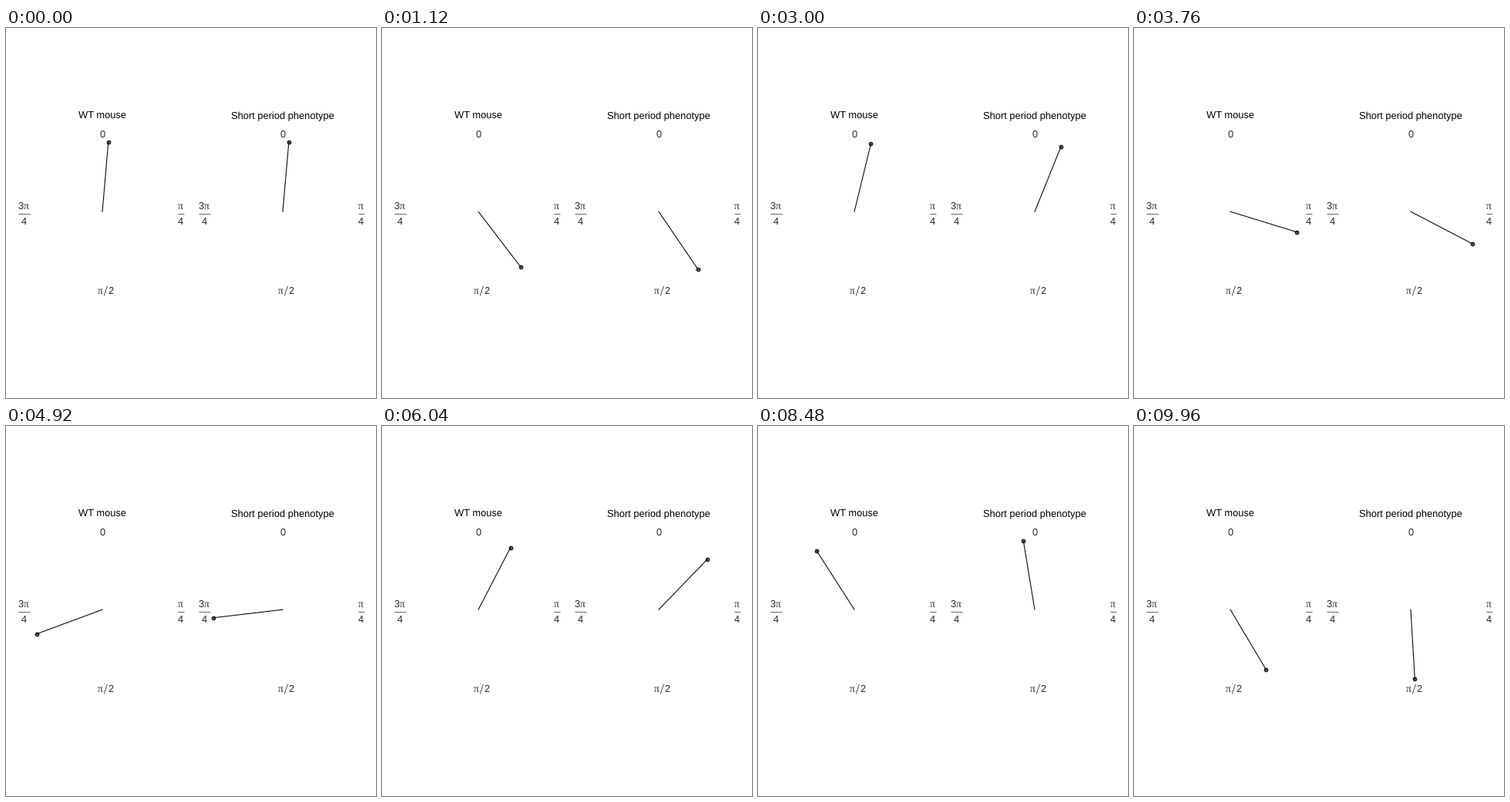
These frames come from a looping animation (480x480 px, 10000 ms). A matplotlib script:

```python
import matplotlib.pyplot as plt
import numpy as np
from matplotlib.animation import FuncAnimation

SIZE, DPI = 480, 72          # at 72 dpi one point is one pixel
FRAMES, INTERVAL = 250, 40
RADIUS, CENTER_Y = 90.3, 238.2
GRAY = "#262626"
SANS, SERIF = "Liberation Sans", "Liberation Serif"

plt.rcParams["text.hinting"] = "none"

fig = plt.figure(figsize=(SIZE / DPI, SIZE / DPI), dpi=DPI, facecolor="white")
ax = fig.add_axes([0, 0, 1, 1])
ax.set_xlim(0, SIZE)
ax.set_ylim(SIZE, 0)
ax.axis("off")


def label(x, baseline, text, font=SANS, color=GRAY, size=12.8):
    ax.text(x, baseline, text, family=font, color=color, size=size,
            ha="center", va="baseline")


def stroke(xs, ys, width):
    ax.plot(xs, ys, color=GRAY, lw=width, solid_capstyle="butt")


def dial(cx, title):
    """Draw the fixed labels of one clock; return its moving hand and tip."""
    label(cx, 118, title, color="black", size=12.85)
    label(cx - 0.3, 142, "0")

    # pi/4 on the right
    label(cx + 101.3, 235, "π", SERIF, size=13.5)
    stroke([cx + 97.5, cx + 105.5], [240.5, 240.5], 0.7)
    label(cx + 101.5, 255, "4")

    # pi/2 at the bottom
    label(cx - 2.8, 345, "π", SERIF, size=13.5)
    stroke([cx + 2.2, cx + 6.4], [347.5, 335], 0.8)
    label(cx + 10.7, 345, "2")

    # 3pi/4 on the left
    label(cx - 106, 235, "3")
    label(cx - 98.5, 235, "π", SERIF, size=13.5)
    stroke([cx - 109.5, cx - 94.5], [240.5, 240.5], 0.7)
    label(cx - 102, 255, "4")

    tip, = ax.plot([], [], "o", ms=4.8, mfc="#5a5a5a", mec="black", mew=0.9)
    hand, = ax.plot([], [], color="black", lw=1.05)
    return hand, tip


# centre x, title, degrees turned per frame
CLOCKS = [(125, "WT mouse", 4.917), (359, "Short period phenotype", 5.0265)]
parts = [(cx, step, *dial(cx, title)) for cx, title, step in CLOCKS]


def draw(i):
    artists = []
    for cx, step, hand, tip in parts:
        angle = np.radians(step * (i + 1))
        x = cx + RADIUS * np.sin(angle)
        y = CENTER_Y - RADIUS * np.cos(angle)
        hand.set_data([cx, x], [CENTER_Y, y])
        tip.set_data([x], [y])
        artists += [hand, tip]
    return artists


anim = FuncAnimation(fig, draw, frames=FRAMES, interval=INTERVAL,
                     repeat=True, repeat_delay=0)
plt.show()
```
